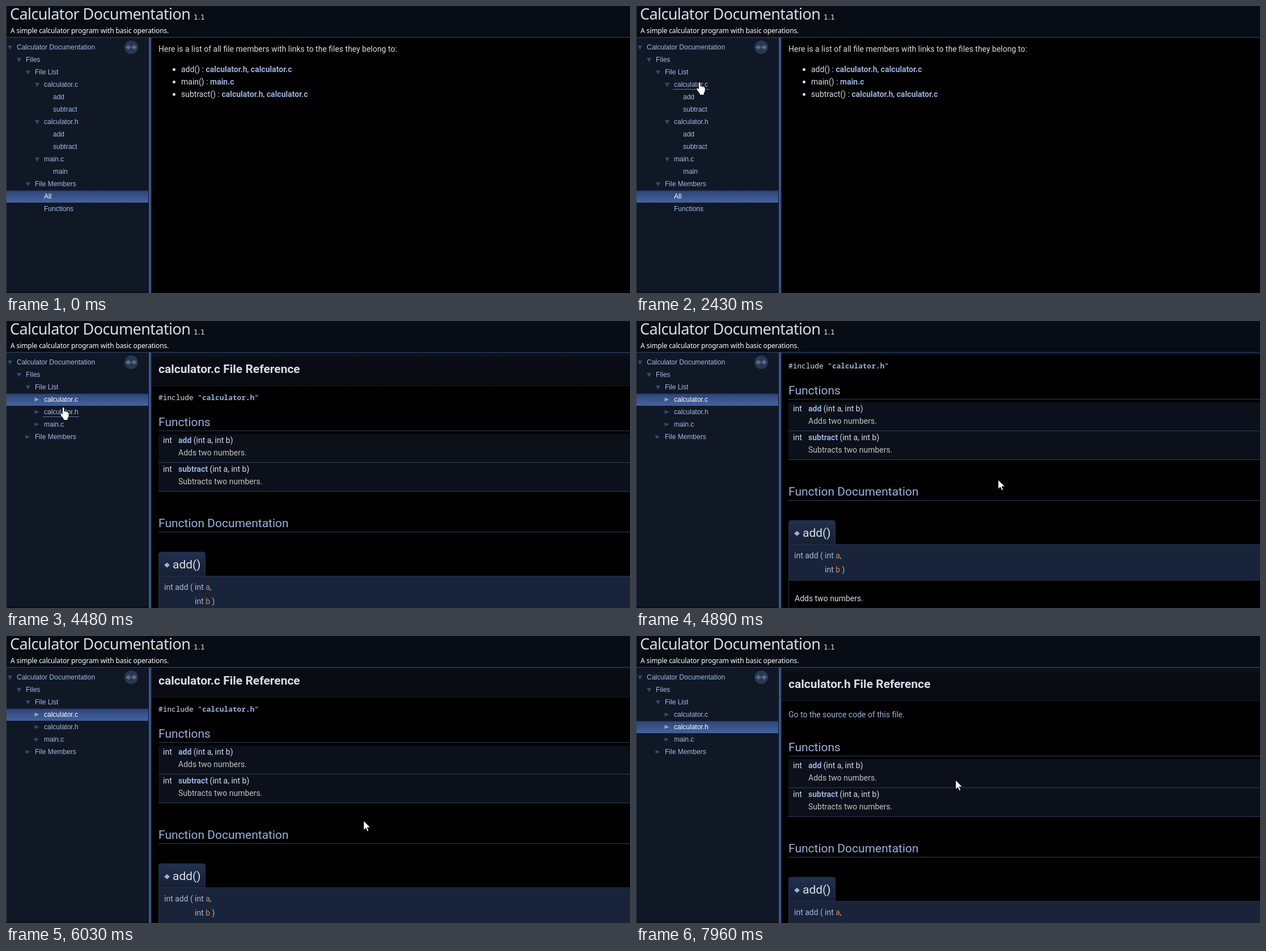
Write an HTML page that moves like this. It is 1101 px wide and 508 px high and loops after 8000 ms.

```html
<!DOCTYPE html>
<html lang="en">
<head>
<meta charset="utf-8">
<title>Calculator Documentation</title>
<style>
  html, body { margin: 0; width: 100%; height: 100%; overflow: hidden; background: #000; }
  svg { display: block; }
  text { font: 14px Roboto, sans-serif; fill: #d8dee5; white-space: pre; }
  .link { fill: #9bb0dc; }
  .bold { font-weight: 700; }
  .head { font-size: 21px; }
  .code { font: 12.83px "Noto Sans Mono", monospace; }
  .note { fill: #c2c2c2; }
  .proto { fill: #a4b8de; }
  .arg { fill: #d28757; }
  .row { fill: #0b101a; }
  .rule { fill: #2c3f65; }
  .name { font: 27px "Noto Sans", sans-serif; letter-spacing: -.6px; }
  .version { font: 12.5px "DejaVu Sans", sans-serif; }
  .brief { font: 12px "Noto Sans", sans-serif; letter-spacing: -.12px; fill: #fff; }
  #tree text { font: 12px "Liberation Sans", Arial, sans-serif; fill: #a3b9e6; }
  #tree path { fill: #334975; }
  #tree .on text { fill: #fff; }
  #tree .on path { fill: #90a5ce; }
  #cursor path { fill: #fff; stroke: #000; stroke-width: .8; }
</style>
</head>
<body>
<svg width="1101" height="508" viewBox="0 0 1101 508">
  <defs>
    <linearGradient id="pick" x2="0" y2="1">
      <stop stop-color="#16213a"/><stop offset=".1" stop-color="#304779"/><stop offset="1" stop-color="#43639f"/>
    </linearGradient>
    <linearGradient id="tab" x2="0" y2="1">
      <stop stop-color="#22304f"/><stop offset="1" stop-color="#162034"/>
    </linearGradient>
    <linearGradient id="band" x2="0" y2="1">
      <stop stop-color="#0d1522"/><stop offset=".2" stop-color="#090c14"/><stop offset="1" stop-color="#080b11"/>
    </linearGradient>
    <linearGradient id="split">
      <stop stop-color="#2b4373"/><stop offset=".3" stop-color="#4668a8"/><stop offset="1" stop-color="#14203a"/>
    </linearGradient>
  </defs>

  <g id="members">
    <text x="269" y="81">Here is a list of all file members with links to the files they belong to:</text>
    <g id="list"></g>
  </g>

  <g id="page">
    <rect x="257" y="56" width="844" height="58" fill="url(#band)"/>
    <rect x="257" y="114" width="844" height="1" fill="#141c2e"/>
    <text id="title" class="head bold" x="269" y="92"></text>
    <text id="include" class="code" x="269" y="140">#include "<tspan class="link bold">calculator.h</tspan>"</text>
    <text id="goto" class="link" x="269" y="144">Go to the source code of this file.</text>
    <g id="docs">
      <text class="head link" x="269" y="186">Functions</text>
      <rect class="rule" x="269" y="194" width="832" height="1"/>
      <g id="functions"></g>
      <text class="head link" x="269" y="365">Function Documentation</text>
      <rect class="rule" x="269" y="373" width="832" height="1"/>
      <g transform="translate(269 451)">
        <path d="M.5 0v-38q0-4 4-4h74q4 0 4 4v38" fill="url(#tab)" stroke="#233250"/>
        <path d="M10-19l5-4.500 5 4.500-5 4.500z" fill="#9bb0dc"/>
        <text class="head" x="25" y="-13">add()</text>
        <rect width="832" height="65" fill="#19243a"/>
        <path d="M832 .5H.5V250" fill="none" stroke="#233250"/>
        <text class="proto" x="10" y="25">int add (</text>
        <text class="proto" x="64" y="25">int <tspan class="arg">a</tspan>,</text>
        <text class="proto" x="64" y="50">int <tspan class="arg">b</tspan> )</text>
        <text x="11" y="101">Adds two numbers.</text>
        <text class="bold" x="11" y="137">Parameters</text>
      </g>
    </g>
  </g>

  <rect width="1101" height="55" fill="#080c14"/>
  <rect y="55" width="1101" height="1" fill="#34486f"/>
  <text class="name" x="7" y="24">Calculator Documentation</text>
  <text class="version" x="331" y="24">1.1</text>
  <text class="brief" x="8" y="48">A simple calculator program with basic operations.</text>

  <rect y="56" width="252" height="452" fill="#101826"/>
  <rect y="505" width="252" height="3" fill="#0b1019"/>
  <rect x="252" y="56" width="5" height="452" fill="url(#split)"/>
  <rect width="1" height="508" fill="#3a4250"/>
  <circle cx="221" cy="73" r="12" fill="#283753"/>
  <path d="M211 73l6-5v3h3v4h-3v3zM231 73l-6-5v3h-3v4h3v3z" fill="#5c6a84"/>
  <g id="tree"></g>
  <rect id="under" x="65" width="64" height="1" fill="#5c78a8"/>
  <g id="cursor">
    <path id="arrow" d="M0 0v16.500l3.800-3.600 2.600 5.900 2.600-1.100-2.600-5.800h5.300z"/>
    <path id="hand" d="M-1.500.5q1.700-1.600 3.400 0V7q2-.8 2.900.6 2-.8 2.900.9 2.200-.4 2.300 1.500v6l-2 3.500v3H.5v-2L-4 14.500q-2.200-3-.8-4t3.300 1.300z"/>
  </g>
</svg>
<script>
const $ = id => document.getElementById(id);
const show = (id, on) => $(id).setAttribute("display", on ? "inline" : "none");
const place = (id, x, y) => $(id).setAttribute("transform", `translate(${x} ${y})`);
const fill = (id, items, draw) => $(id).innerHTML = items.map(draw).join("");
const link = name => `<tspan class="link bold">${name}</tspan>`;

const both = `${link("calculator.h")}, ${link("calculator.c")}`;
fill("list", [`add() : ${both}`, `main() : ${link("main.c")}`, `subtract() : ${both}`], (item, i) =>
  `<g transform="translate(309 ${117 + 22 * i})"><circle cx="-12.5" cy="-4.5" r="2.5" fill="#d8dee5"/><text>${item}</text></g>`);

fill("functions", ["add", "subtract"], (name, i) =>
  `<g transform="translate(269 ${200 + 51 * i})">
    <rect class="row" width="832" height="50"/><rect class="rule" y="50" width="832" height="1"/>
    <text x="8" y="16">int</text><text x="35" y="16">${link(name)} (int a, int b)</text>
    <text class="note" x="35" y="38">${name[0].toUpperCase() + name.slice(1)}s two numbers.</text></g>`);

// Each row: indent level, marker (v open, > closed, - leaf), label
const trunk = "0v Calculator Documentation|1v Files|2v File List|";
const openTree = trunk + "3v calculator.c|4- add|4- subtract|3v calculator.h|4- add|4- subtract|" +
  "3v main.c|4- main|2v File Members|3- All|3- Functions";
const shutTree = trunk + "3> calculator.c|3> calculator.h|3> main.c|2> File Members";
const marks = { v: "M3-7h8l-4 7.500z", ">": "M2.500-7.500l8 3.500-8 3.500z", "-": "" };

function drawTree(rows, selected) {
  fill("tree", rows.split("|"), (row, i) => {
    const y = 77 + 22 * i, on = i === selected;
    const bar = on ? `<rect x="1" y="${y - 15}" width="250" height="22" fill="url(#pick)"/>` : "";
    return `${bar}<g class="${on ? "on" : ""}" transform="translate(${16 * row[0]} ${y})">
      <path d="${marks[row[1]]}"/><text x="19">${row.slice(3)}</text></g>`;
  });
}

function ease(t, start, end) {
  const p = Math.max(0, Math.min(1, (t - start) / (end - start)));
  return p * p * (3 - 2 * p);
}

// Pointer moves after it appears at the first spot
const entry = { time: 200, x: 722, y: 352 };
const moves = [
  { start: 200, end: 970, x: 112, y: 135 },
  { start: 2500, end: 3240, x: 101, y: 153 },
  { start: 4480, end: 4690, x: 639, y: 281 },
  { start: 5280, end: 5560, x: 656, y: 338 },
  { start: 5700, end: 5890, x: 644, y: 319 },
  { start: 5890, end: 6030, x: 631, y: 327 },
  { start: 6030, end: 6450, x: 706, y: 396 },
  { start: 6520, end: 7150, x: 100, y: 156 },
  { start: 7690, end: 7960, x: 564, y: 255 }
];

function pointer(t) {
  let { x, y } = entry;
  for (const m of moves) {
    const k = ease(t, m.start, m.end);
    x += (m.x - x) * k;
    y += (m.y - y) * k;
  }
  return [Math.round(x), Math.round(y)];
}

let scene = -1;
function setScene(next) {
  if (next === scene) return;
  scene = next;
  drawTree(scene ? shutTree : openTree, [12, 3, 4][scene]);
  show("members", scene === 0);
  show("page", scene > 0);
  show("include", scene === 1);
  show("goto", scene === 2);
  $("title").textContent = `calculator.${scene === 2 ? "h" : "c"} File Reference`;
  place("docs", 0, scene === 2 ? 18 : 0);
}

function frame(now) {
  const t = now % 8000;
  setScene(t >= 7600 ? 2 : t >= 2490 ? 1 : 0);
  // One wheel notch down, later one up
  place("page", 0, -Math.round(100 * (ease(t, 4758, 5003) - ease(t, 5824, 6069))));

  const [x, y] = pointer(t), row = Math.floor((y - 62) / 22);
  const hover = x >= 65 && x <= 130 && (row === 3 || row === 4);
  const seen = t >= entry.time;
  show("cursor", seen);
  show("hand", hover);
  show("arrow", !hover);
  show("under", seen && hover);
  $("under").setAttribute("y", 81 + 22 * row);
  place("cursor", x, y);
  requestAnimationFrame(frame);
}
requestAnimationFrame(frame);
</script>
</body>
</html>
```
